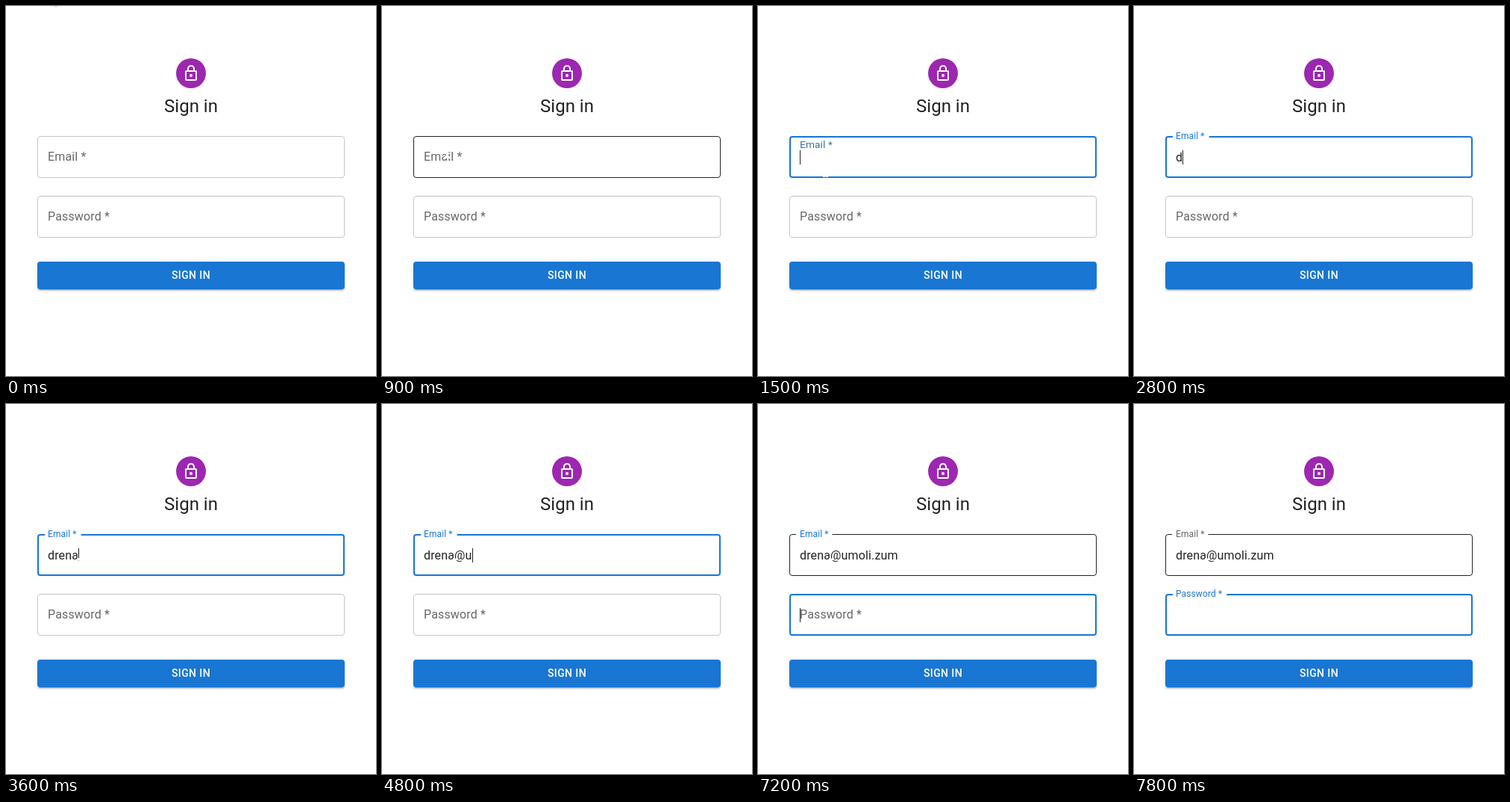
An HTML page for the animation above (8 s loop, 496 px wide and 495 px high).

```html
<!DOCTYPE html>
<html lang="en">
<head>
<meta charset="utf-8">
<title>Sign in</title>
<style>
  html, body { margin: 0; width: 100%; height: 100%; overflow: hidden; background: #fff; }
  body { position: relative; font-family: Roboto, sans-serif; }
  svg { position: absolute; left: 0; top: 0; }
  .button {
    position: absolute; left: 42px; top: 342px; width: 412px; height: 36.5px;
    border-radius: 4px; background: #1976d2; color: #fff; text-align: center;
    font: 500 14px/36.5px Roboto, sans-serif; letter-spacing: .4px;
    box-shadow: 0 3px 1px -2px rgba(0,0,0,.2), 0 2px 2px rgba(0,0,0,.14), 0 1px 5px rgba(0,0,0,.12);
  }
  .tooltip {
    position: absolute; left: 101px; top: 235px; width: 175px; height: 26px;
    box-sizing: border-box; border: 1px solid #333; background: #fff; color: #333;
    font: 14.87px/24px "Open Sans", "Noto Sans", sans-serif; white-space: nowrap; padding-left: 7px;
    box-shadow: 0 5px 20px rgba(0,0,0,.3);
  }
  .field text { font-size: 16px; letter-spacing: .15px; }
</style>
</head>
<body>
<div class="button">SIGN IN</div>
<svg id="stage" width="496" height="495" viewBox="0 0 496 495">
  <circle cx="248" cy="90" r="20" fill="#9c27b0"/>
  <g transform="translate(236 78)" fill="none" stroke="#fff" stroke-width="2">
    <rect x="5" y="9" width="14" height="12" rx="1"/>
    <path d="M8 9V6a4 4 0 0 1 8 0v3"/>
    <circle cx="12" cy="15" r="2" fill="#fff" stroke="none"/>
  </g>
  <text x="248" y="142" font-size="24" text-anchor="middle" fill="#212121">Sign in</text>
  <g id="fields"></g>
  <g id="arrow">
    <path d="M0 0V15.5L3.6 12.2L6 18L8.8 16.8L6.4 11.2H11.2Z" fill="#111" stroke="#fff"
      style="filter:drop-shadow(0 1px 1px rgba(0,0,0,.35))"/>
  </g>
  <g id="beam" fill="none">
    <path id="beamShape" d="M-3.5 -7.5H-1.5L0 -6.5L1.5 -7.5H3.5M0 -6.5V6.5M-3.5 7.5H-1.5L0 6.5L1.5 7.5H3.5"
      stroke="#fff" stroke-width="2.6"/>
    <use href="#beamShape" style="stroke:#222"/>
  </g>
</svg>
<div class="tooltip" id="tooltip">Please fill out this field.</div>

<script>
const LOOP = 8000, STEP = 100;
const EMAIL = "drena@umoli.zum";
const KEY_TIMES = [2800, 3000, 3200, 3400, 3600, 4300, 4800, 5000, 5100, 5200, 5500, 5800, 6100, 6300, 6600];
const GREY = [102, 102, 102], BLUE = [25, 118, 210];
const FOCUS_EMAIL = 1400, FOCUS_PASSWORD = 7200;

const byId = id => document.getElementById(id);
const clamp = v => Math.min(1, Math.max(0, v));
const lerp = (a, b, p) => a + (b - a) * p;
const mix = (a, b, p) => `rgb(${a.map((v, i) => Math.round(lerp(v, b[i], p)))})`;
const between = (t, from, to) => t >= from && t < to;

// cubic-bezier(0, 0, .2, 1)
function easeOut(x) {
  if (x <= 0) return 0;
  if (x >= 1) return 1;
  let lo = 0, hi = 1;
  for (let i = 0; i < 24; i++) {
    const s = (lo + hi) / 2;
    if (.6 * (1 - s) * s * s + s ** 3 < x) lo = s; else hi = s;
  }
  return 3 * (1 - lo) * lo * lo + lo ** 3;
}

function add(parent, tag, attrs) {
  const el = document.createElementNS("http://www.w3.org/2000/svg", tag);
  set(el, attrs);
  return parent.appendChild(el);
}

function set(el, attrs) {
  for (const key in attrs) el.setAttribute(key, attrs[key]);
}

function show(el, visible) {
  el.style.display = visible ? "" : "none";
}

function createField(top, name) {
  const group = add(byId("fields"), "g", { class: "field" });
  const border = add(group, "rect", { fill: "none" });
  const notch = add(group, "rect", { y: top, height: 2, fill: "#fff" });
  const label = add(group, "text", { y: 17 });
  const value = add(group, "text", { x: 56, y: top + 34, fill: "#212121" });
  const caret = add(group, "rect", { y: top + 19, width: 1, height: 19, fill: "#212121" });
  label.textContent = name;

  return ({ focused, hovered, elapsed, tint, text, caretOn }) => {
    const line = focused ? 2 : 1, half = line / 2;
    set(border, {
      x: 42 + half, y: top + half, width: 412 - line, height: 56 - line, rx: 4 - half,
      "stroke-width": line, stroke: focused ? "#1976d2" : hovered ? "#212121" : "#c4c4c4"
    });
    const shrink = easeOut(elapsed / 200);
    const fullNotch = label.getComputedTextLength() * .75 + 10;
    set(notch, {
      x: 50 + line,
      width: Math.min(fullNotch, 394 * easeOut((elapsed - 50) / 100))
    });
    set(label, {
      transform: `translate(56 ${top + lerp(16, -9, shrink)}) scale(${lerp(1, .75, shrink)})`,
      fill: mix(GREY, BLUE, tint)
    });
    value.textContent = text;
    set(caret, { x: Math.round(56 + (text ? value.getComputedTextLength() : 0)) });
    show(caret, caretOn);
  };
}

const drawEmail = createField(174, "Email *");
const drawPassword = createField(254, "Password *");

// The email label pauses briefly during its move.
function emailElapsed(t) {
  if (t < 1500) return 0;
  return t < 1700 ? 50 : t - 1550;
}

function pointer(t) {
  const p = clamp((t - 500) / 500), enter = p * p * (3 - 2 * p);
  const nudge = clamp((t - 1900) / 200);
  return [lerp(60, 90.5, enter) + 8 * nudge, lerp(-18.5, 220, enter) - 5 * nudge];
}

function render(time) {
  const t = Math.floor(time / STEP) * STEP;
  const [x, y] = pointer(t);
  const hovered = y > 174;
  const inPassword = t >= FOCUS_PASSWORD;
  const elapsed = emailElapsed(t);
  const passwordElapsed = Math.max(0, t - FOCUS_PASSWORD - 20);
  const passwordTint = easeOut(passwordElapsed / 200);

  drawEmail({
    focused: between(t, FOCUS_EMAIL, FOCUS_PASSWORD),
    hovered, elapsed,
    tint: inPassword ? 1 - passwordTint : easeOut(elapsed / 200),
    text: EMAIL.slice(0, KEY_TIMES.filter(k => k <= t).length),
    caretOn: between(t, FOCUS_EMAIL, 2000) || between(t, 2600, 4200) || between(t, 4300, FOCUS_PASSWORD)
  });
  drawPassword({
    focused: inPassword,
    hovered: false,
    elapsed: passwordElapsed,
    tint: passwordTint,
    text: "",
    caretOn: between(t, FOCUS_PASSWORD, 7800)
  });

  show(byId("tooltip"), between(t, 1300, FOCUS_EMAIL));
  for (const id of ["arrow", "beam"]) {
    set(byId(id), { transform: `translate(${x} ${y})` });
    show(byId(id), (id === "beam") === hovered);
  }
}

const start = performance.now();
function tick() {
  render((performance.now() - start) % LOOP);
  requestAnimationFrame(tick);
}
tick();
</script>
</body>
</html>
```
